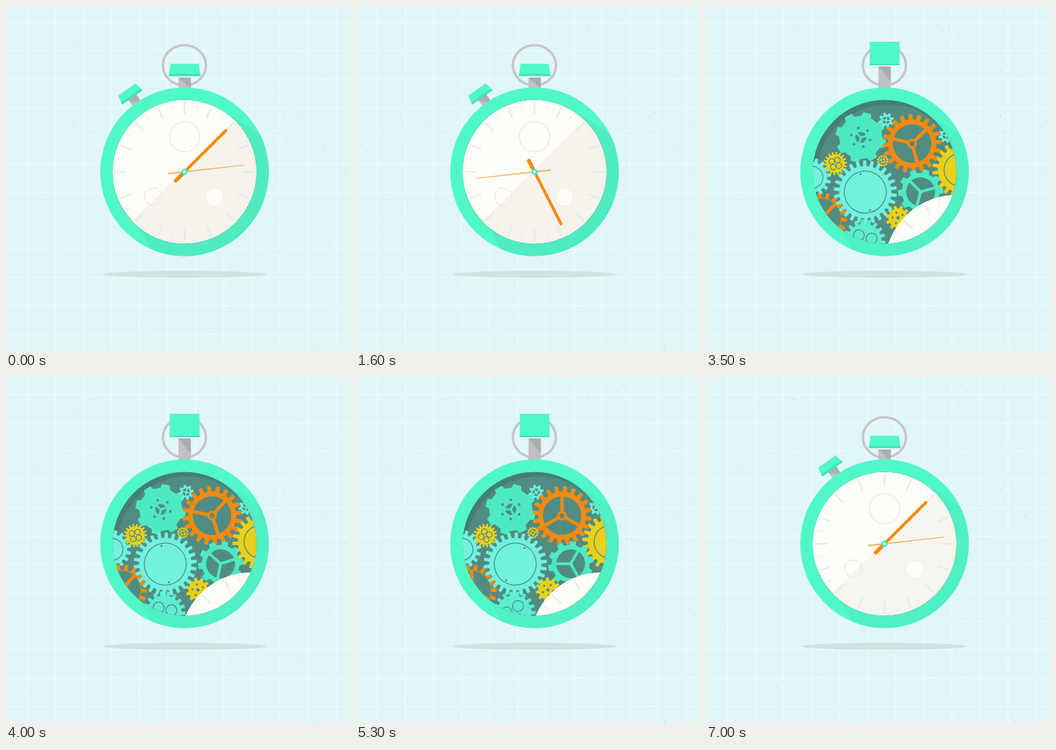
An HTML page that plays this animation: 500x500 px, repeating every 7100 ms.

```html
<!DOCTYPE html>
<html lang="en">
<head>
<meta charset="utf-8">
<title>Stopwatch</title>
<style>
html, body { margin: 0; width: 100%; height: 100%; overflow: hidden; background: #e0f6f7; }
svg { display: block; width: 100vw; height: 100vh; }
</style>
</head>
<body>
<svg id="stage" viewBox="0 0 500 500" xmlns="http://www.w3.org/2000/svg">
  <defs>
    <clipPath id="well"><circle cx="259.5" cy="241" r="104.5"/></clipPath>
    <clipPath id="rim"><path clip-rule="evenodd" d="M137 241a122.5 122.5 0 1 0 245 0a122.5 122.5 0 1 0 -245 0zM155 241a104.5 104.5 0 1 0 209 0a104.5 104.5 0 1 0 -209 0z"/></clipPath>
    <clipPath id="disc"><circle r="104.5"/></clipPath>
  </defs>
  <rect width="500" height="500" fill="#e0f6f7"/>
  <g id="grid" stroke="#e8fafa" stroke-width="2.4"></g>
  <g id="specks" fill="#9dbfc0"></g>
  <ellipse cx="259.5" cy="390" rx="119.5" ry="5" fill="#cfe4e2"/>
  <g id="confetti" fill="none" stroke="#f58a0a" stroke-linecap="round"></g>
  <g id="watch">
    <ellipse cx="259.3" cy="86.3" rx="31.3" ry="29.3" fill="none" stroke="#c6c6ca" stroke-width="3.6"/>
    <path id="stem" fill="#c1c0c2"/>
    <path id="stemShade" fill="#adabad"/>
    <path id="cap" fill="#50f8c8"/>
    <path id="capEdge" fill="#45e3b8"/>
    <g id="side">
      <rect x="-7" y="-134" width="14" height="18" fill="#c1c0c2"/>
      <path d="M-7 -130L7 -118V-134H-7z" fill="#afadaf"/>
      <path d="M-15.5 -146H15.5L18 -132H-18z" fill="#50f8c8"/>
      <path d="M-17.4 -135.4H17.4L18 -132H-18z" fill="#45e3b8"/>
    </g>
    <circle cx="259.5" cy="241" r="122.5" fill="#50f8c8"/>
    <g clip-path="url(#rim)">
      <path id="rimShade" d="M330 160L372 189L440 400L214 358L188 312z" fill="#4febc1"/>
    </g>
    <g clip-path="url(#well)">
      <circle cx="259.5" cy="241" r="105" fill="#467d77"/>
      <circle cx="265" cy="248" r="105" fill="#518c83"/>
      <g id="gears"></g>
      <g id="dial">
        <circle r="104.5" fill="#fefdf7"/>
        <path id="dialShade" clip-path="url(#disc)" d="M80 -82L-76 72L-60 110H110V-82z" fill="#f5f3ec"/>
        <circle r="102" fill="none" stroke="#f0ebe2" stroke-width="1" stroke-dasharray="3 2"/>
        <g id="ticks" stroke="#dcedea"></g>
        <circle cy="-51" r="22" fill="none" stroke="#ecebe6" stroke-width="1.5"/>
        <circle cx="-45.5" cy="36" r="12.5" fill="none" stroke="#ebe9e3" stroke-width="1.4" stroke-dasharray="14 3"/>
        <circle cx="43.5" cy="37" r="12.5" fill="#fefdf7" stroke="#ebe9e3" stroke-dasharray="3 2"/>
        <path id="thin" d="M-1.1 24L-.5 -87H.5L1.1 24z" fill="#f3b260"/>
        <g id="thick" stroke="#f58a0a" stroke-linecap="round">
          <path d="M0 0V-85" stroke-width="4.2"/>
          <path d="M0 0V18" stroke-width="5.6"/>
        </g>
        <circle r="3.3" fill="#fff" stroke="#3ee6cb" stroke-width="2.4"/>
      </g>
    </g>
  </g>
</svg>
<script>
const LOOP = 7100, STEP = 100;
const CX = 259.5, CY = 241;
const DARK = '#518c83', TEAL = '#4deac2', CYAN = '#70f2df', ORANGE = '#f18b10', YELLOW = '#e8d01c';
const $ = id => document.getElementById(id);

function add(parent, tag, attrs) {
  const el = document.createElementNS('http://www.w3.org/2000/svg', tag);
  for (const k in attrs) el.setAttribute(k, attrs[k]);
  parent.appendChild(el);
  return el;
}
const set = (id, name, value) => $(id).setAttribute(name, value);
const turn = (id, a) => set(id, 'transform', `rotate(${a})`);

// Eased interpolation through [time, value] pairs.
function track(t, keys) {
  if (t <= keys[0][0]) return keys[0][1];
  for (let i = 1; i < keys.length; i++) {
    const [t0, a] = keys[i - 1], [t1, b] = keys[i];
    if (t < t1) {
      const u = (t - t0) / (t1 - t0);
      return a + (b - a) * u * u * (3 - 2 * u);
    }
  }
  return keys[keys.length - 1][1];
}

let seed = 17;
function rnd() {
  seed = (seed * 16807) % 2147483647;
  return seed / 2147483647;
}

function buildBackground() {
  for (let i = 0; i < 12; i++) {
    const x = 31 + i * 40.8, y = 24 + i * 41.2;
    add($('grid'), 'path', { d: `M${x} 0V500M0 ${y}H500` });
  }
  for (let i = 0; i < 330; i++) {
    add($('specks'), 'circle', {
      cx: (rnd() * 500).toFixed(1), cy: (rnd() * 500).toFixed(1),
      r: (0.3 + rnd() * 0.45).toFixed(2), opacity: (0.2 + rnd() * 0.5).toFixed(2)
    });
  }
}

function buildTicks() {
  for (let i = 0; i < 32; i++) {
    const major = i % 2 === 0;
    add($('ticks'), 'path', {
      d: `M0 -101V${major ? -84 : -92}`, 'stroke-width': major ? 2 : 1.2,
      opacity: major ? 1 : 0.6, transform: `rotate(${i * 11.25})`
    });
  }
}

function gearPath(r, n, depth) {
  const pts = [], pitch = 2 * Math.PI / n;
  for (let i = 0; i < n; i++) {
    for (const [f, rad] of [[-0.29, r - depth], [-0.2, r], [0.2, r], [0.29, r - depth]]) {
      const a = (i + f) * pitch;
      pts.push((rad * Math.sin(a)).toFixed(2) + ' ' + (-rad * Math.cos(a)).toFixed(2));
    }
  }
  return 'M' + pts.join('L') + 'z';
}

function dots(g, n, dist, r, attrs, start = 0) {
  for (let i = 0; i < n; i++) {
    const a = (start + i * 360 / n) * Math.PI / 180;
    add(g, 'circle', { cx: dist * Math.sin(a), cy: -dist * Math.cos(a), r, ...attrs });
  }
}

const line = { fill: 'none', stroke: DARK, 'stroke-width': 1.3 };
const hole = { fill: DARK };

function spokes(g, color, r, n, start, width, hub) {
  add(g, 'circle', { r, ...hole });
  for (let i = 0; i < n; i++)
    add(g, 'path', { d: `M0 0V${-r - 1}`, stroke: color, 'stroke-width': width, transform: `rotate(${start + i * 360 / n})` });
  add(g, 'circle', { r: hub, fill: color });
  if (hub > 3) add(g, 'circle', { r: hub * 0.5, ...hole });
}

const inner = {
  hub(g, c) { spokes(g, c, 8, 3, 60, 3, 2); dots(g, 6, 14, 2, hole, 30); },
  small(g, c) { spokes(g, c, 5.5, 4, 20, 1.6, 1.8); },
  wheel(g, c) { spokes(g, c, 28, 3, 30, 5, 7); },
  tri(g, c) { spokes(g, c, 21, 3, 60, 4, 3); },
  four(g) { dots(g, 4, 6, 4, line, 45); },
  cross(g) {
    add(g, 'circle', { r: 5, ...line });
    add(g, 'path', { d: 'M-5 0H5M0 -5V5', ...line });
  },
  plate(g) { add(g, 'circle', { r: 30.5, ...line }); dots(g, 2, 27, 1.5, hole); },
  ring(g) { add(g, 'circle', { r: 24, ...line }); },
  ringSmall(g) { add(g, 'circle', { r: 16, ...line }); },
  loops(g) { dots(g, 3, 11, 8, line, 60); },
  points(g) { dots(g, 5, 8, 1.6, hole); add(g, 'circle', { r: 2.4, ...hole }); }
};

// x, y, radius, teeth, tooth depth, colour, middle, direction
const gears = [
  [370, 238, 41, 22, 8, YELLOW, 'ring', 1],
  [168, 308, 37, 18, 8, ORANGE, 'wheel', -1],
  [154, 249, 28, 16, 6, CYAN, 'ringSmall', -1],
  [230, 341, 31, 18, 6, '#5ceed0', 'loops', -1],
  [225, 191, 37, 8, 5.5, TEAL, 'hub', -1],
  [262, 166, 11, 8, 3, CYAN, 'small', 1],
  [349, 188, 11, 8, 3, CYAN, 'small', 1],
  [299.5, 200, 43, 20, 8, ORANGE, 'wheel', -1],
  [188, 229, 17, 18, 3.5, YELLOW, 'four', 1],
  [257, 225, 8.5, 12, 1.5, YELLOW, 'cross', 1],
  [312, 270, 33, 10, 5.5, TEAL, 'tri', -1],
  [279, 308, 18, 11, 4, YELLOW, 'points', 1],
  [231.5, 270.5, 46, 26, 8, CYAN, 'plate', 1]
].map(([x, y, r, n, depth, color, kind, dir]) => {
  const g = add($('gears'), 'g', {});
  add(g, 'path', { d: gearPath(r, n, depth), fill: color });
  inner[kind](g, color);
  return { g, x, y, dir };
});

// Each piece sits at its drawn place when the spread is 1.
const pieces = [
  [108, 71, 1.6, 'M-11 -4Q2 -3 12 4'],
  [106, 116, 2.2, 'M-14 -9Q2 -4 15 9'],
  [420, 110, 1.8, 'M-11 4Q-1 -2 11 -3'],
  [397, 155, 3.4, 'M-10 1Q-3 -4 3 -3C12 -4 11 7 5 6C-1 5 0 -3 6 -8'],
  [185, -60, 2, 'M-6 -12Q1 -2 5 12'],
  [335, -70, 2, 'M6 -12Q-1 -2 -5 12']
].map(([x, y, w, d]) => ({ x, y, el: add($('confetti'), 'path', { d, 'stroke-width': w }) }));

function drawConfetti(t) {
  const k = t < 5 ? (t - 2.3) / 0.4 : (t - 6.55) / 0.2;
  const shown = k > 0.1 && k < 1.95;
  set('confetti', 'visibility', shown ? 'visible' : 'hidden');
  if (!shown) return;
  for (const p of pieces) {
    const x = CX + (p.x - CX) * k, y = 130 + (p.y - 130) * k;
    p.el.setAttribute('transform', `translate(${x} ${y})`);
  }
}

function drawButtons(t) {
  const e = track(t, [[2.1, 0], [2.3, 1.15], [2.7, 0.88], [3.1, 1], [6.45, 1], [6.7, -0.12], [6.9, 0]]);
  const mix = (a, b) => a + (b - a) * e;
  const top = mix(84, 52), low = mix(102, 86);
  const a = mix(20.5, 21.5), b = mix(23, 21.8), edge = low - mix(3.5, 2.2);
  const stemTop = low + 2, m = 259.7;
  set('cap', 'd', `M${m - a} ${top}H${m + a}L${m + b} ${low}H${m - b}z`);
  set('capEdge', 'd', `M${m - b + 0.3} ${edge}H${m + b - 0.3}L${m + b} ${low}H${m - b}z`);
  set('stem', 'd', `M250.7 ${stemTop}H268.5V124H250.7z`);
  set('stemShade', 'd', `M250.7 ${stemTop}H268.5V${stemTop + 16 + 6 * e}z`);
  const inset = track(t, [[2, 0], [2.2, 32], [6.55, 32], [6.75, -4], [6.9, 0]]);
  set('side', 'transform', `translate(${CX} ${CY}) rotate(-35) translate(0 ${inset})`);
}

function drawDial(t) {
  const x = track(t, [[2.8, CX], [3.3, 366], [3.5, 364], [4, 357], [6.25, 357], [6.65, CX]]);
  const y = track(t, [[2.8, CY], [3.3, 376], [3.5, 379], [4, 387], [6.25, 387], [6.65, CY]]);
  const tilt = track(t, [[2.8, 0], [3.3, -5], [3.5, -4], [4, 0]]);
  set('dial', 'transform', `translate(${x} ${y}) rotate(${tilt})`);
  turn('thick', t > 4 ? 45 : 45 + 67.5 * Math.min(t, 1.97));
  turn('thin', t > 4 ? 83.5 : 83.5 + 337.5 * Math.min(t, 2.393));
  set('dialShade', 'opacity', track(t, [[3.4, 1], [4.2, 0], [6.4, 0], [7, 0.75]]));
  set('rimShade', 'opacity', track(t, [[2.8, 1], [3.4, 0.6]]));
}

function draw(t) {
  const sway = track(t, [[2.1, 0], [2.3, 1], [2.75, 1], [3.2, 0]]);
  const tilt = 2.3 * sway * Math.cos(5 * Math.PI * (t - 2.7));
  set('watch', 'transform', `rotate(${tilt} 259 277)`);
  const spin = 7.71 * Math.pow(Math.max(0, t - 3.3), 2.536) - 15;
  for (const { g, x, y, dir } of gears)
    g.setAttribute('transform', `translate(${x} ${y}) rotate(${dir * spin})`);
  drawButtons(t);
  drawDial(t);
  drawConfetti(t);
}

function frame() {
  const ms = performance.now() % LOOP;
  draw(Math.floor(ms / STEP) * STEP / 1000);
  requestAnimationFrame(frame);
}

buildBackground();
buildTicks();
draw(0);
requestAnimationFrame(frame);
</script>
</body>
</html>
```
